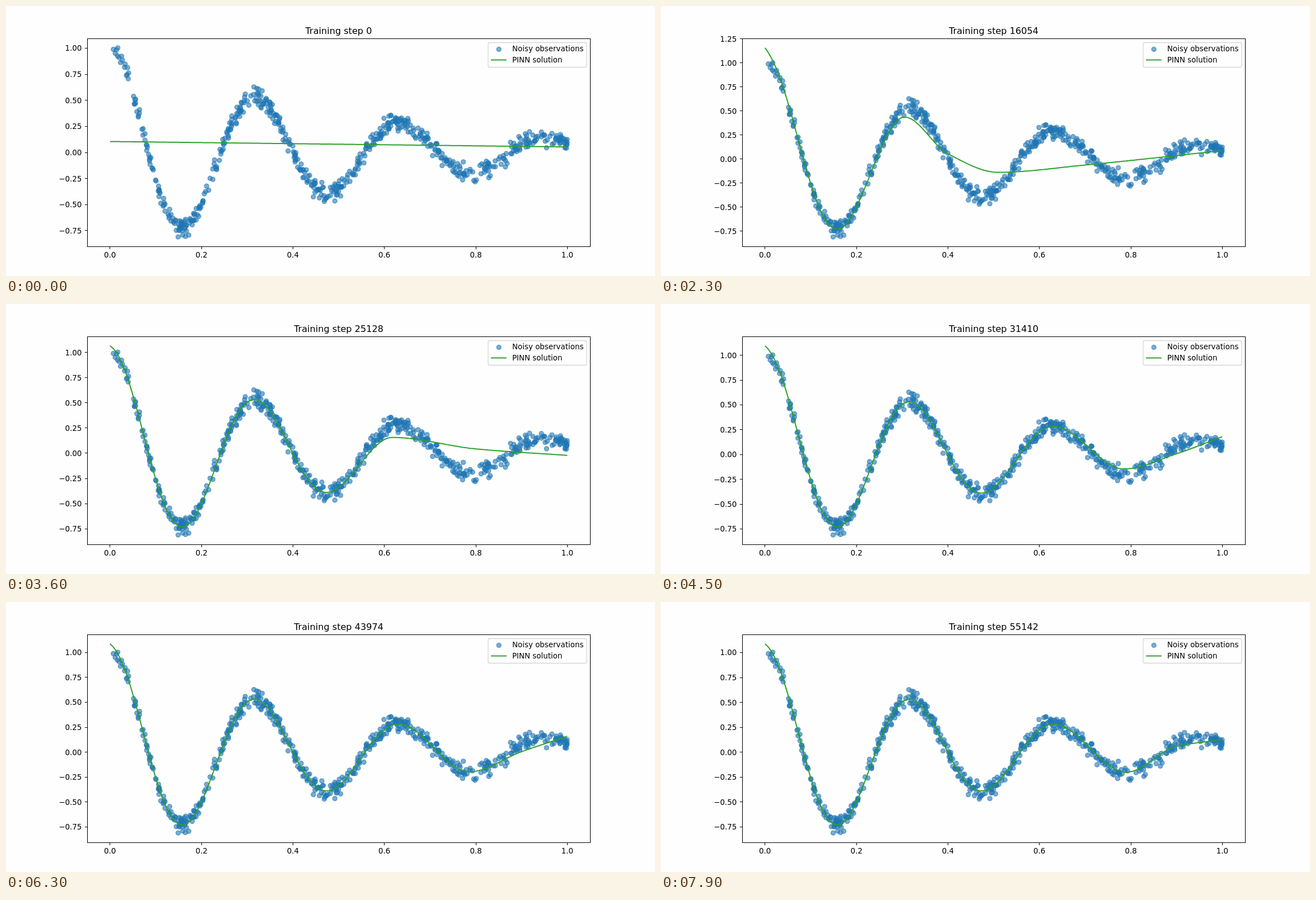
An HTML page with a canvas that plays this animation: 1159x483 px, repeating every 8 s.

```html
<!DOCTYPE html>
<html lang="en">
<head>
<meta charset="utf-8">
<title>Training a damped oscillator</title>
<style>
html, body { margin: 0; width: 100%; height: 100%; overflow: hidden; background: #fefefe; }
canvas { display: block; }
</style>
</head>
<body>
<canvas id="stage" width="1159" height="483"></canvas>
<script>
const ctx = document.getElementById('stage').getContext('2d');
const LOOP = 8000, STEP_MS = 100, STEPS_PER_TICK = 698;
const LEFT = 145, RIGHT = 1043, TOP = 58, BOTTOM = 430;
const BLUE = '#1f77b4', GREEN = '#2ca02c', PAPER = '#fefefe', FONT = '"DejaVu Sans", sans-serif';
const LOW = -0.81, HIGH = 1.003, OMEGA = 19.9, HALF_WAVE = Math.PI / OMEGA;

const damped = x => Math.exp(-2 * x) * (Math.cos(OMEGA * x) + 2 / OMEGA * Math.sin(OMEGA * x));
const toX = x => 185.7 + 816.7 * x;

// Monotone cubic through the knots: flat at turning points, harmonic mean slope elsewhere
function spline(knots, startSlope) {
  const secant = i => (knots[i + 1][1] - knots[i][1]) / (knots[i + 1][0] - knots[i][0]);
  const last = knots.length - 1;
  const slopes = knots.map((_, i) => {
    if (i === 0) return startSlope;
    if (i === last) return secant(last - 1);
    const a = secant(i - 1), b = secant(i);
    return a * b > 0 ? 2 * a * b / (a + b) : 0;
  });
  return x => {
    let i = 0;
    while (i < last - 1 && x > knots[i + 1][0]) i++;
    const [x0, y0] = knots[i], [x1, y1] = knots[i + 1], h = x1 - x0, t = (x - x0) / h;
    return y0 + (y1 - y0) * t * t * (3 - 2 * t)
      + h * t * (1 - t) * (slopes[i] * (1 - t) - slopes[i + 1] * t);
  };
}

// Follows the true wave for some half waves, then an unlearned tail; lift is the error at x = 0.
function partial(halfWaves, lift, tail, startSlope = 0) {
  const join = halfWaves * HALF_WAVE;
  const rest = spline([[join, damped(join)], ...tail], startSlope);
  return x => (x < join ? damped(x) : rest(x)) + lift * Math.exp(-40 * x);
}

const keys = [
  [0, x => 0.105 - 0.052 * x],
  [900, x => 0.88 * Math.exp(-9 * x) - 0.04 * (1 - x)],
  [1500, partial(0, -0.02, [[0.155, -0.308], [0.28, -0.02], [0.39, 0.086], [0.6, 0.017], [0.8, -0.013], [1, 0.005]], -12.4)],
  [2300, partial(1, 0.157, [[0.305, 0.437], [0.4, 0.055], [0.51, -0.138], [0.7, -0.062], [1, 0.088]])],
  [3600, partial(3, 0.065, [[0.617, 0.157], [0.8, 0.043], [1, -0.021]])],
  [4500, partial(4, 0.095, [[0.785, -0.145], [0.9, 0.008], [1, 0.18]])],
  [6300, partial(4, 0.087, [[0.785, -0.197], [0.9, 0.005], [1, 0.16]])],
  [7900, partial(4, 0.088, [[0.79, -0.2], [0.9, 0.06], [1, 0.126]])]
];

function solutionAt(time) {
  let i = 0;
  while (i < keys.length - 2 && time >= keys[i + 1][0]) i++;
  const [t0, from] = keys[i], [t1, to] = keys[i + 1], f = (time - t0) / (t1 - t0);
  return Array.from({ length: 401 }, (_, n) => {
    const x = n / 400;
    return [x, from(x) * (1 - f) + to(x) * f];
  });
}

let seed = 20;
function random() {
  seed = (seed * 1664525 + 1013904223) % 4294967296;
  return seed / 4294967296;
}

// The two extreme observations set the axis range.
const points = [[0.149, LOW], [0.017, HIGH]];
while (points.length < 620) {
  const x = 0.005 + 0.995 * random();
  const y = damped(x) + (random() + random() + random() - 1.5) * 0.08;
  if (y > LOW && y < HIGH) points.push([x, y]);
}

function line(coords, color, width) {
  ctx.beginPath();
  coords.forEach(([x, y]) => ctx.lineTo(x, y));
  ctx.strokeStyle = color;
  ctx.lineWidth = width;
  ctx.stroke();
}

function dots(coords) {
  ctx.globalAlpha = 0.6;
  ctx.fillStyle = ctx.strokeStyle = BLUE;
  ctx.lineWidth = 1.4;
  coords.forEach(([x, y]) => {
    ctx.beginPath();
    ctx.arc(x, y, 4, 0, 2 * Math.PI);
    ctx.fill();
    ctx.stroke();
  });
  ctx.globalAlpha = 1;
}

function label(text, x, y, align, size = 13.42) {
  ctx.font = `${size}px ${FONT}`;
  ctx.textAlign = align;
  ctx.fillStyle = '#000';
  ctx.fillText(text, x, y);
}

function drawLegend() {
  ctx.globalAlpha = 0.8;
  ctx.beginPath();
  ctx.roundRect(861, 65.5, 176, 44, 2.7);
  ctx.fillStyle = PAPER;
  ctx.fill();
  ctx.strokeStyle = '#ccc';
  ctx.lineWidth = 1.3;
  ctx.stroke();
  dots([[880.2, 77.4]]);
  line([[866, 96.5], [893.8, 96.5]], GREEN, 2);
  label('Noisy observations', 904, 80.6, 'left');
  label('PINN solution', 904, 100.6, 'left');
}

function draw(tick) {
  const solution = solutionAt(tick * STEP_MS);
  const high = Math.max(HIGH, ...solution.map(p => p[1]));
  const margin = (high - LOW) * 0.05;
  const scale = (BOTTOM - TOP) / (high - LOW + 2 * margin);
  const toY = y => TOP + (high + margin - y) * scale;
  const place = ([x, y]) => [toX(x), toY(y)];

  ctx.fillStyle = PAPER;
  ctx.fillRect(0, 0, 1159, 483);
  dots(points.map(place));
  ctx.lineJoin = 'round';
  line(solution.map(place), GREEN, 2);

  for (let i = 0; i <= 5; i++) {
    const x = Math.floor(toX(i / 5)) + 0.5;
    line([[x, BOTTOM + 0.5], [x, BOTTOM + 5.2]], '#000', 1);
    label((i / 5).toFixed(1), toX(i / 5), 450.3, 'center');
  }
  for (let v = -0.75; v <= high + margin; v += 0.25) {
    const y = Math.floor(toY(v)) + 0.5;
    line([[LEFT - 4.2, y], [LEFT + 0.5, y]], '#000', 1);
    label(v.toFixed(2).replace('-', '\u2212'), 135.3, toY(v) + 4.9, 'right');
  }
  ctx.lineWidth = 1.07;
  ctx.strokeRect(LEFT + 0.5, TOP + 0.5, RIGHT - LEFT, BOTTOM - TOP);
  label('Training step ' + tick * STEPS_PER_TICK, 594, 50, 'center', 16.1);
  drawLegend();
}

let shown = -1;
function animate() {
  const tick = Math.floor(performance.now() % LOOP / STEP_MS);
  if (tick !== shown) draw(shown = tick);
  requestAnimationFrame(animate);
}
animate();
</script>
</body>
</html>
```
